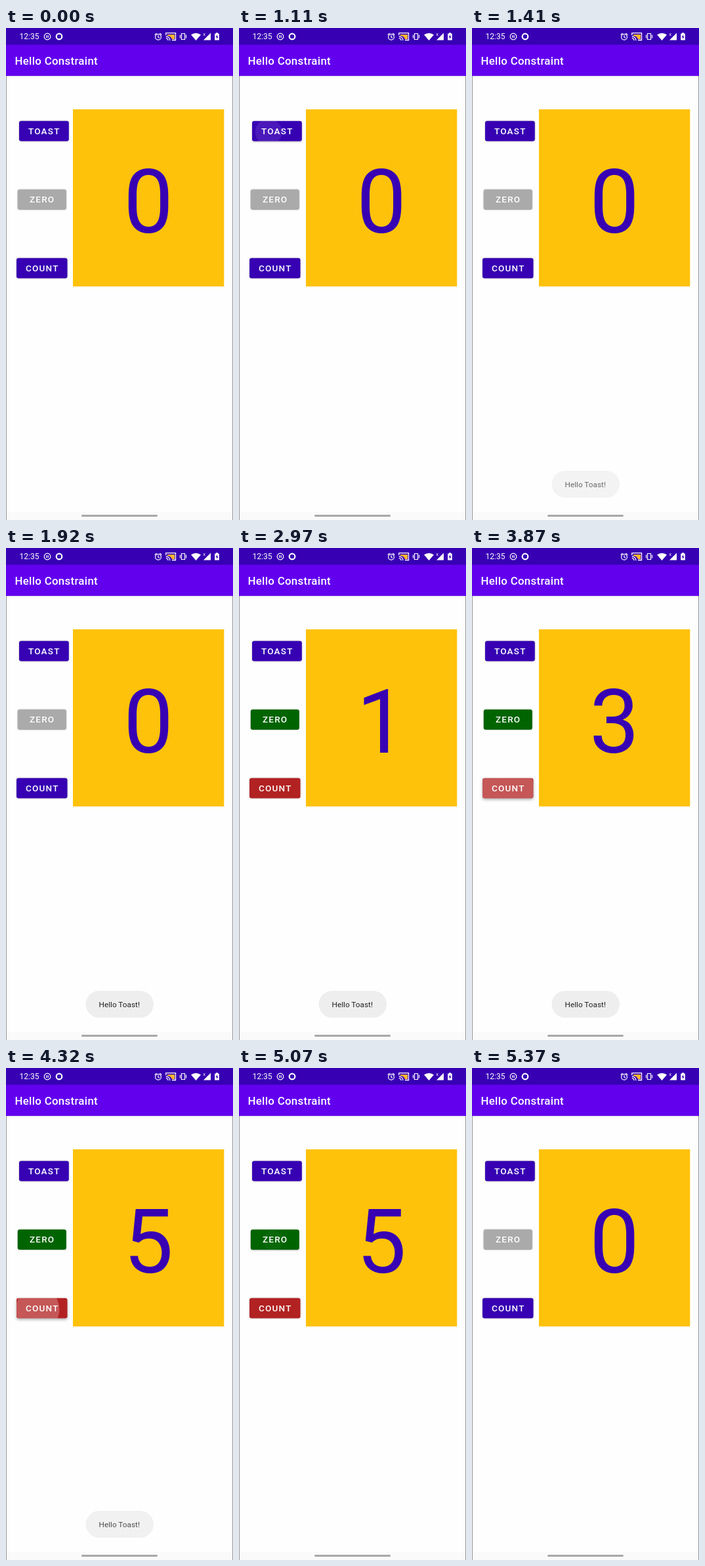
Recreate the animation shown at these times as an HTML page. Size 346x750 px, loop 6000 ms.

```html
<!DOCTYPE html>
<html lang="en">
<head>
<meta charset="utf-8">
<style>
  html, body { margin: 0; width: 100%; height: 100%; overflow: hidden; background: #fff; }
  svg { display: block; width: 346px; height: 750px; font-family: Roboto, sans-serif; }
  .label { font-size: 13.5px; font-weight: 500; letter-spacing: 1.2px; fill: #fff; }
  .line { fill: none; stroke: #fff; }
</style>
</head>
<body>
<svg viewBox="0 0 346 750">
  <rect width="346" height="750" fill="#fefefe"/>
  <rect y="738" width="346" height="12" fill="#fafafa"/>
  <rect x="115" y="742" width="116" height="3" rx="1.5" fill="#a8a8a8"/>
  <path d="M.5 73V750M345.5 73V750" stroke="#999"/>
  <rect y="72" width="346" height="2" fill="#000" opacity=".12"/>
  <rect width="346" height="73" fill="#6200ee"/>
  <rect width="346" height="25.5" fill="#3700b3"/>
  <text x="20.5" y="17.3" font-size="12" fill="#fff">12:35</text>
  <text x="13.5" y="56" font-size="16.84" font-weight="500" letter-spacing=".3" fill="#fff">Hello Constraint</text>

  <g class="line" stroke-width="1.2">
    <circle cx="63" cy="13" r="4.8"/>
    <path d="M61.8 11V15M64.2 11V15"/>
    <circle cx="81" cy="13" r="4.3" stroke-width="2.2"/>
    <circle cx="232" cy="13.7" r="4.4"/>
    <path d="M232 11V14L234 15.2M226.7 10.5L229.6 8M237.3 10.5L234.4 8"/>
    <path d="M267.5 8.5H272.5V17.5H267.5ZM265.5 10.5V15.5M274.5 10.5V15.5"/>
  </g>
  <path d="M246 10H257V17H253Q251 12 246 12Z" fill="#ffb52e"/>
  <g class="line" stroke-width="1.3">
    <path d="M243.8 11V7.7H258.5V18.5H253M243.8 13A5.7 5.7 0 0 1 249.8 19M243.8 15.7A3 3 0 0 1 247 19"/>
  </g>
  <g fill="#fff">
    <path d="M282 10.3Q289.5 5 297 10.3L289.5 19ZM301 18.5L312 7.5V18.5Z"/>
    <path d="M318.2 8.5H320V7.3H323V8.5H324.8V18.6H318.2Z"/>
    <text x="300.5" y="11.5" font-size="7">x</text>
  </g>
  <path d="M322.2 10L319.7 14H321.2V17L323.5 13H322.1Z" fill="#3700b3"/>

  <rect x="102" y="124" width="230.3" height="270" fill="#ffc20a"/>
  <text id="digit" x="217" y="311.5" font-size="134.7" text-anchor="middle" fill="#3700b3"></text>
  <g id="buttons"></g>
  <g id="toast">
    <rect x="121.5" y="675" width="103.5" height="41" rx="20.5" fill="#eee"/>
    <text x="141.5" y="700" font-size="11.8" fill="#222">Hello Toast!</text>
  </g>
</svg>
<script>
const LOOP = 6000, CLICK_DELAY = 45;
const PURPLE = '#3700b3', GREY = '#aaa', GREEN = '#006400', RED = '#b22222', BLACK = '#080808';
const COUNT_TAPS = [2645, 3400, 3670, 3950, 4230], ZERO_TAP = 5060;
const $ = id => document.getElementById(id);
const ramp = (t, from, to) => Math.min(1, Math.max(0, (t - from) / (to - from)));

function makeButton(name, x, y, w, textX, touchX, taps) {
  const h = 30.7, box = `x="${x}" y="${y}" width="${w}" height="${h}" rx="3.2"`;
  const group = document.createElementNS('http://www.w3.org/2000/svg', 'g');
  group.innerHTML = `<clipPath id="clip${name}"><rect ${box}/></clipPath>
    <rect ${box}/>
    <circle cx="${touchX}" cy="${y + 17}" fill="#fff" clip-path="url(#clip${name})"/>
    <text class="label" x="${textX}" y="${y + 20.2}">${name}</text>`;
  $('buttons').append(group);
  const face = group.children[1], ripple = group.querySelector('circle');

  return (t, color) => {
    const age = t - (taps.filter(tap => tap <= t).pop() ?? -LOOP);
    const strength = ramp(age, 0, 75) * (1 - ramp(age, 200, 310));
    const lift = color === GREY ? 0 : strength;
    face.style.fill = color;
    face.style.filter = `drop-shadow(0 ${0.8 + 1.4 * lift}px ${0.8 + 1.2 * lift}px rgba(0,0,0,.32))`;
    ripple.setAttribute('r', 12 + 36 * (1 - (1 - ramp(age, 0, 250)) ** 2));
    ripple.setAttribute('opacity', 0.24 * lift);
  };
}

const toastButton = makeButton('TOAST', 20, 141.8, 75.8, 34, 45, [1080]);
const zeroButton = makeButton('ZERO', 17.8, 246.2, 74, 36, 52, [ZERO_TAP]);
const countButton = makeButton('COUNT', 16, 350.7, 77.5, 30, 48, COUNT_TAPS);

function draw(t) {
  const clicked = tap => t >= tap + CLICK_DELAY;
  const count = clicked(ZERO_TAP) ? 0 : COUNT_TAPS.filter(clicked).length;
  $('digit').textContent = count;
  toastButton(t, PURPLE);
  zeroButton(t, count ? GREEN : GREY);
  countButton(t, !count ? PURPLE : count % 2 ? RED : BLACK);
  $('toast').setAttribute('opacity', ramp(t, 1230, 1500) * (1 - ramp(t, 4260, 4560)));
}

function tick() {
  draw(performance.now() % LOOP);
  requestAnimationFrame(tick);
}
tick();
</script>
</body>
</html>
```
